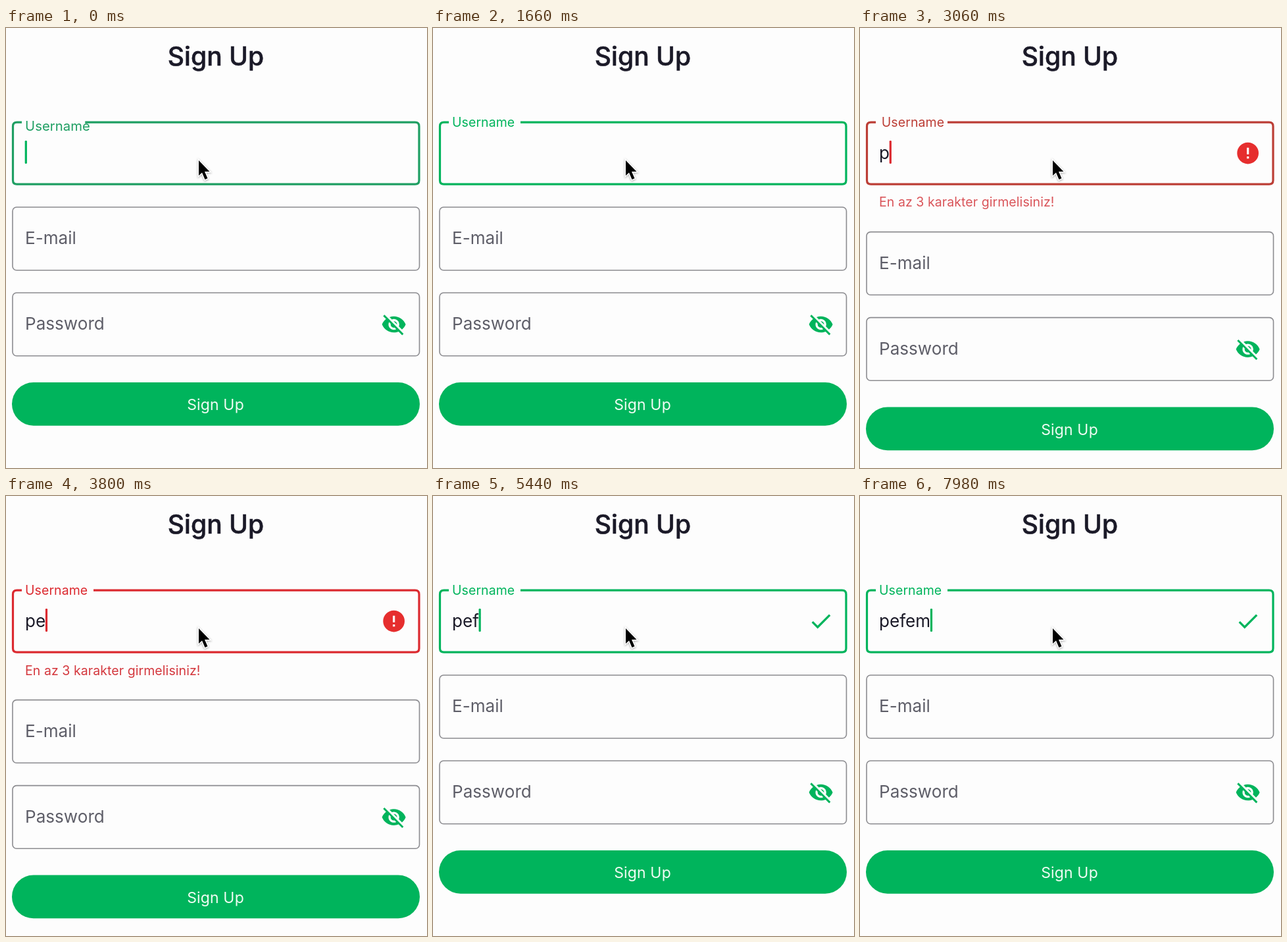
An HTML page that plays this animation: 640 by 668 pixels, repeating every 8000 ms.

```html
<!DOCTYPE html>
<html lang="en">
<head>
<meta charset="utf-8">
<title>Sign Up</title>
<style>
  html, body { margin: 0; width: 100%; height: 100%; overflow: hidden; background: #fdfdfd; }
  svg { display: block; width: 640px; height: 668px; }
  text { font: 26.1px Inter, sans-serif; font-optical-sizing: none; fill: #1b1a28; }
  .title { font-size: 39.1px; font-weight: 500; text-anchor: middle; stroke: #1b1a28; stroke-width: .5; }
  .hint { fill: #5e5e68; }
  .small { font-size: 19.5px; letter-spacing: .07px; }
  .button { font-size: 23px; letter-spacing: .15px; text-anchor: middle; fill: #f0fcf4; }
  .box { fill: none; stroke: #8c8c90; stroke-width: 1.6; }
  #error { fill: #d4383e; }
</style>
</head>
<body>
<svg viewBox="0 0 640 668">
  <text class="title" x="319" y="57">Sign Up</text>

  <path id="border" fill="none" stroke-width="3.2"/>
  <text id="label" class="small">Username</text>
  <text id="value" x="29" y="199"></text>
  <rect id="caret" y="171" width="3.2" height="35" rx="1.2"/>
  <g transform="translate(570 170.4) scale(1.636)">
    <path id="check" fill="#00b45c" d="M9 16.17 4.83 12l-1.42 1.41L9 19 21 7l-1.41-1.41z"/>
    <g id="alert">
      <circle cx="12" cy="12" r="10" fill="#e62e2e"/>
      <path fill="#fdfdfd" d="M11 7h2v6h-2zM11 15h2v2h-2z"/>
    </g>
  </g>
  <text id="error" class="small" x="29">En az 3 karakter girmelisiniz!</text>

  <g id="rest">
    <rect class="box" x="10" y="272" width="618.5" height="95.7" rx="6"/>
    <text class="hint" x="29" y="328">E-mail</text>
    <rect class="box" x="10" y="402" width="618.5" height="95.7" rx="6"/>
    <text class="hint" x="29" y="458">Password</text>
    <path transform="translate(570 430.4) scale(1.636)" fill="#00b45c" d="M12 7c2.76 0 5 2.24 5 5 0 .65-.13 1.26-.36 1.83l2.92 2.92c1.51-1.26 2.7-2.89 3.43-4.75-1.73-4.39-6-7.5-11-7.5-1.4 0-2.74.25-3.98.7l2.16 2.16C10.74 7.13 11.35 7 12 7zM2 4.27l2.74 2.74C3.08 8.3 1.78 10.02 1 12c1.73 4.39 6 7.5 11 7.5 1.55 0 3.03-.3 4.38-.84L19.73 22 21 20.73 3.27 3zM7.53 9.8l1.55 1.55c-.05.21-.08.43-.08.65 0 1.66 1.34 3 3 3 .22 0 .44-.03.65-.08l1.55 1.55c-.67.33-1.41.53-2.2.53-2.76 0-5-2.24-5-5 0-.79.2-1.53.53-2.2zm4.31-.78 3.15 3.15.02-.16c0-1.66-1.34-3-3-3z"/>
    <rect x="9" y="538" width="620" height="65.7" rx="32.8" fill="#00b45c"/>
    <text class="button" x="318.5" y="580">Sign Up</text>
  </g>

  <path d="M293 201V224L298 219.5 302.5 230 306.5 228.3 302 218H309.5Z" fill="#000" stroke="#fff" stroke-width="3" paint-order="stroke" style="filter:drop-shadow(0 1px 1.5px #0005)"/>
</svg>
<script>
const LOOP = 8000, FADE = 234, BLINK = 1400;
const NAME = 'pefem';
// Moments the caret restarts: focus, then one per typed letter.
const KEYS = [-560, 2861, 3700, 4900, 5900, 7400];
const [, ERROR_ON, , ERROR_OFF] = KEYS;
const GREEN = '#00b45c', RED = '#dc2a30', GREY = '#6c6c74';

const el = id => document.getElementById(id);
const show = (node, on) => node.setAttribute('visibility', on ? 'visible' : 'hidden');
const ramp = (t, start) => Math.min(1, Math.max(0, (t - start) / FADE));
const mix = (a, b, p) => `color-mix(in srgb, ${b} ${p * 100}%, ${a})`;
const shake = p => 6.5 * (p <= .25 ? -p : p < .75 ? p - .5 : (1 - p) * 4);

function draw(t) {
  const typed = KEYS.filter(k => k <= t).length - 1;
  const invalid = typed === 1 || typed === 2;
  const enter = ramp(t, ERROR_ON);
  const redness = enter - ramp(t, ERROR_OFF);
  const tint = redness > 0 ? mix(GREEN, RED, redness) : mix(GREY, GREEN, ramp(t, -165));

  // The label is finishing its rise to the border.
  const sunk = .12 * Math.max(0, 1 - t / 100) ** 2.5;
  const gapEnd = 24 + 109 * (1 - sunk);
  el('border').setAttribute('d', `M${gapEnd} 143.2H622q6 0 6 6V231.2q0 6-6 6H16.5q-6 0-6-6V149.2q0-6 6-6H24`);
  el('border').style.stroke = tint;
  el('label').style.fill = tint;
  el('label').setAttribute('transform',
    `translate(${29 + shake(enter)} ${150 + 47 * sunk}) scale(${1 + sunk / 3})`);

  el('value').textContent = NAME.slice(0, typed);
  el('caret').setAttribute('x', 28.7 + (typed && el('value').getComputedTextLength()));
  el('caret').style.fill = invalid ? RED : GREEN;
  show(el('caret'), (t - KEYS[typed]) % BLINK < BLINK / 2);

  show(el('alert'), invalid);
  show(el('check'), typed > 2);
  show(el('error'), invalid);
  el('error').setAttribute('y', 272 - 10 * (1 - enter));
  el('error').setAttribute('opacity', enter);
  el('rest').setAttribute('transform', `translate(0 ${invalid ? 37.6 : 0})`);
}

const start = performance.now();
function tick() {
  draw((performance.now() - start) % LOOP);
  requestAnimationFrame(tick);
}
tick();
</script>
</body>
</html>
```
